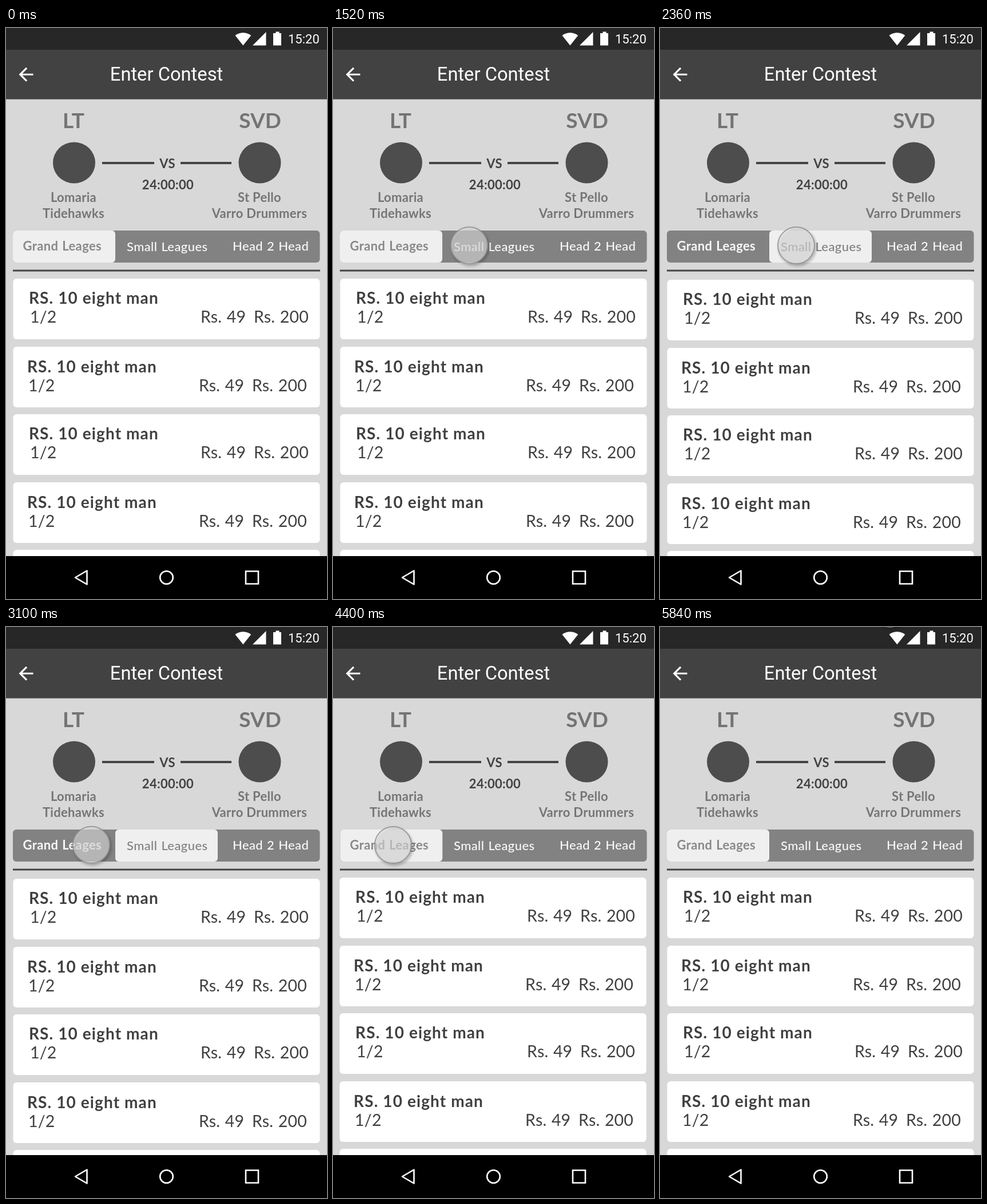
Write an HTML page that moves like this. It is 561 px wide and 998 px high and loops after 6020 ms.

```html
<!DOCTYPE html>
<html lang="en">
<head>
<meta charset="utf-8">
<title>Enter Contest</title>
<style>
  html, body { margin: 0; width: 100%; height: 100%; overflow: hidden; background: #d8d8d8; }
  svg { display: block; width: 561px; height: 998px; }
  text { font-family: Lato, sans-serif; }
  .roboto { font-family: Roboto, sans-serif; fill: #fff; }
  .mid { text-anchor: middle; }
  .bold { font-weight: 700; }
  .code { font-size: 37px; fill: #747474; }
  .team { font-size: 22px; fill: #757575; letter-spacing: .3px; }
  .info { font-size: 22px; fill: #424242; letter-spacing: .3px; }
  .tab { font-size: 22px; letter-spacing: .4px; word-spacing: 1px; }
  .card text { font-size: 28.5px; fill: #404040; letter-spacing: .2px; word-spacing: 1px; }
  .card .bold { font-size: 28px; letter-spacing: 1.1px; word-spacing: 0; }
</style>
</head>
<body>
<svg viewBox="0 0 561 998">
  <rect width="561" height="998" fill="#d8d8d8"/>
  <rect width="561" height="124.6" fill="#424242"/>
  <rect width="561" height="38" fill="#272727"/>

  <g fill="#fff">
    <path transform="translate(400 4.7) scale(1.2)" d="M12 21.5 23.6 7C23.2 6.7 18.7 3 12 3S.8 6.7.4 7Z"/>
    <path d="M431 30.5 454.5 7V30.5Z"/>
    <path d="M468 9H471.5V6.5H477.5V9H481V30.5H467V9Z"/>
    <path transform="translate(16.3 62.5) scale(1.56)" d="M20 11H7.83l5.59-5.59L12 4l-8 8 8 8 1.41-1.41L7.83 13H20z"/>
  </g>
  <text class="roboto" x="493" y="27" font-size="22">15:20</text>
  <text class="roboto mid" x="280.5" y="92" font-size="32.7">Enter Contest</text>

  <g class="mid bold">
    <text class="code" x="118" y="175">LT</text>
    <text class="code" x="444" y="175">SVD</text>
    <text class="team" x="118" y="304">Lomaria</text>
    <text class="team" x="118" y="332">Tidehawks</text>
    <text class="team" x="443" y="304">St Pello</text>
    <text class="team" x="443" y="332">Varro Drummers</text>
    <text class="info" x="282" y="245">VS</text>
    <text class="info" x="283" y="282">24:00:00</text>
  </g>
  <g fill="#4d4d4d">
    <ellipse cx="119" cy="235.5" rx="37" ry="36"/>
    <ellipse cx="443.5" cy="235.5" rx="37" ry="36"/>
  </g>
  <path d="M168 236H259M305 236H394" stroke="#444" stroke-width="4"/>

  <rect x="12" y="354" width="536.5" height="56" rx="6" fill="#828282"/>
  <rect id="marker" y="354" width="179" height="56" rx="6" fill="#efefef"/>
  <text id="grand" class="tab bold" x="29.5" y="389">Grand Leages</text>
  <text id="small" class="tab" font-weight="500" x="211" y="390">Small Leagues</text>
  <text class="tab" font-weight="500" x="396" y="389" fill="#fafafa">Head 2 Head</text>
  <path d="M12 424H549" stroke="#444" stroke-width="3"/>

  <g id="grandList" class="card"></g>
  <g id="smallList" class="card"></g>

  <rect y="923" width="561" height="75"/>
  <g fill="none" stroke="#fff" stroke-width="2.6" stroke-linejoin="round">
    <path d="M121 960.5 141.5 948.5V972.5Z"/>
    <circle cx="280.5" cy="960.5" r="11.3"/>
    <path d="M419 949.5H441V971.5H419Z" stroke-linejoin="miter"/>
  </g>

  <g id="pointer">
    <circle r="32" fill="rgba(236,236,236,.58)" stroke="rgba(145,145,145,.85)" stroke-width="2"/>
  </g>
</svg>
<script>
const LOOP = 6020, PAGE_STEP = 590;
const $ = id => document.getElementById(id);

const cards = [0, 1, 2, 3, 4].map(i => {
  const y = Math.round(438 + i * 118.6), odd = i % 2, x = 41 - 3 * odd, base = y + 44 + odd;
  return `<rect x="12.5" y="${y}" width="536" height="106" rx="6" fill="#fff"/>
    <text class="bold" x="${x - 1}" y="${base}">RS. 10 eight man</text>
    <text x="${x + 1}" y="${base + 33}">1/2</text>
    <text x="${x + 299}" y="${base + 33}">Rs. 49</text>
    <text x="${x + 392}" y="${base + 33}">Rs. 200</text>`;
}).join('');
$('grandList').innerHTML = $('smallList').innerHTML = cards;

const clamp = v => Math.min(1, Math.max(0, v));
const cubic = (a, b, c, d, u) => {
  const v = 1 - u;
  return v * v * v * a + 3 * v * v * u * b + 3 * v * u * u * c + u * u * u * d;
};

// Standard ease, cubic-bezier(.4, 0, .2, 1)
function ease(x) {
  let lo = 0, hi = 1;
  for (let i = 0; i < 24; i++) {
    const m = (lo + hi) / 2;
    if (cubic(0, .4, .2, 1, m) < x) lo = m; else hi = m;
  }
  return cubic(0, 0, 1, 1, lo);
}

// Critically damped spring from 0 to 1
function spring(ms) {
  if (ms <= 0) return 0;
  if (ms >= 340) return 1;
  const k = ms * .0365;
  return 1 - (1 + k) * Math.exp(-k);
}

// Pointer strokes: start, duration, x controls, y controls
const strokes = [
  [60, 700, [402, 395, 190, 162], [-41, 150, 405, 417.5]],
  [800, 720, [162, 140, 205, 238], [417.5, 430, 385, 380]],
  [2800, 700, [238, 194, 149, 105], [380, 380, 381, 381]],
  [4780, 1080, [105, 300, 430, 402], [381, 290, 0, -32]]
];

const grey = (a, b, p) => {
  const v = Math.round(a + (b - a) * p);
  return `rgb(${v},${v},${v})`;
};

function draw(t) {
  const page = spring(t - 2020) - spring(t - 4160);
  $('marker').setAttribute('x', 12 + 179 * page);
  $('grand').setAttribute('fill', grey(137, 247, page));
  $('small').setAttribute('fill', grey(250, 128, page));
  $('grandList').setAttribute('transform', `translate(${-PAGE_STEP * page} 0)`);
  $('smallList').setAttribute('transform', `translate(${PAGE_STEP * (1 - page)} 2)`);

  const [start, time, xs, ys] = strokes.findLast(s => t >= s[0]) || strokes[0];
  const u = ease(clamp((t - start) / time));
  const pressed = (t >= 1920 && t < 2040) || (t >= 4060 && t < 4180);
  $('pointer').setAttribute('transform', `translate(${cubic(...xs, u)} ${cubic(...ys, u)})`);
  $('pointer').style.filter = `drop-shadow(${pressed ? '0 1px 1px' : '2px 3px 2px'} rgba(0,0,0,.35))`;
}

let origin;
function tick(now) {
  origin ??= now;
  draw((now - origin) % LOOP);
  requestAnimationFrame(tick);
}
draw(0);
requestAnimationFrame(tick);
</script>
</body>
</html>
```
